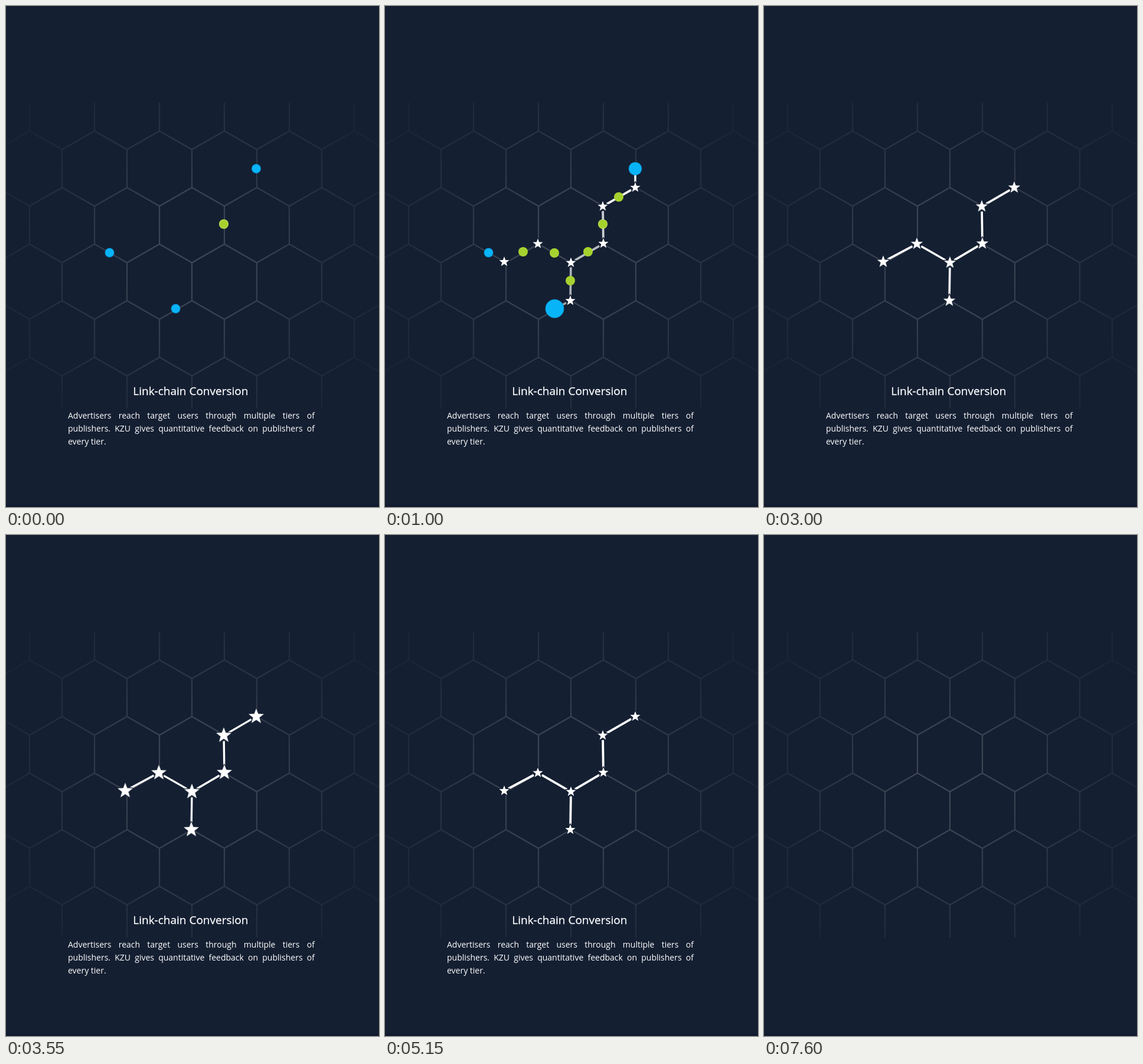
Recreate the animation shown at these times as an HTML page with a canvas. Size 632 by 850 pixels, loop 8 s.

```html
<!DOCTYPE html>
<html lang="en">
<head>
<meta charset="utf-8">
<title>Link-chain Conversion</title>
<style>
  html, body { margin: 0; width: 100%; height: 100%; overflow: hidden; background: #141f32; }
  canvas { position: absolute; left: 0; top: 0; }
  #text { color: #fff; font: 14px/22px "Open Sans", sans-serif; }
  #text div { position: absolute; left: 105px; width: 418px; text-align-last: justify; white-space: nowrap; }
  #text h1 { position: absolute; left: 215.3px; top: 639.5px; margin: 0; white-space: nowrap;
    font: 19px/26px "Open Sans", sans-serif; -webkit-text-stroke: .3px #fff; }
  #text .last { text-align-last: left; }
</style>
</head>
<body>
<canvas id="stage" width="632" height="850"></canvas>
<div id="text">
  <h1>Link-chain Conversion</h1>
  <div style="top:684px">Advertisers reach target users through multiple tiers of</div>
  <div style="top:706px">publishers. KZU gives quantitative feedback on publishers of</div>
  <div style="top:728px" class="last">every tier.</div>
</div>
<script>
const LOOP = 8000, BG = '#141f32', BLUE = '#08b4f8', GREEN = '#a6d22f';
const ctx = document.getElementById('stage').getContext('2d');
const text = document.getElementById('text');

const stars = [[424, 308], [369, 340], [370, 403], [315, 435.5], [314, 500], [259, 403.5], [202, 434]];
const greens = [[396, 324], [344, 417], [314, 466], [287, 419], [234, 417]];
const hub = [369, 370];
// Each dot: position, then the start of its two pulses
const blues = [
  { at: [424, 276], star: 0, pulses: [300, 690], lineStart: 600 },
  { at: [287.5, 513.5], star: 4, pulses: [380, 810], lineStart: 780 },
  { at: [175.5, 418.5], star: 6, pulses: [450, 1000], lineStart: 1000 }
];
// Star links: from, to, start of the fade
const links = [[0, 1, 620], [1, 2, 700], [2, 3, 740], [3, 4, 760], [3, 5, 1000], [5, 6, 1000]];

const clamp = x => Math.max(0, Math.min(1, x));
const ramp = (t, start, length) => clamp((t - start) / length);
const smooth = x => x * x * (3 - 2 * x);
const pulse = (t, start, length) => Math.sin(Math.PI * ramp(t, start, length));
const distance = (a, b) => Math.hypot(a[0] - b[0], a[1] - b[1]);
const appear = (t, p) => ramp(t, 30 + distance(p, hub) * 2.6, 220);

function disc([x, y], r, fill, alpha) {
  ctx.globalAlpha = alpha;
  ctx.fillStyle = fill;
  ctx.beginPath();
  ctx.arc(x, y, r, 0, 7);
  ctx.fill();
}

function line(a, b, trimA, trimB, width, alpha) {
  const d = distance(a, b), ux = (b[0] - a[0]) / d, uy = (b[1] - a[1]) / d;
  ctx.globalAlpha = alpha;
  ctx.strokeStyle = '#fff';
  ctx.lineWidth = width;
  ctx.beginPath();
  ctx.moveTo(a[0] + ux * trimA, a[1] + uy * trimA);
  ctx.lineTo(b[0] - ux * trimB, b[1] - uy * trimB);
  ctx.stroke();
}

function star([x, y], r, alpha, halo) {
  ctx.beginPath();
  for (let i = 0; i < 10; i++) {
    const k = i % 2 ? r * .42 : r, a = Math.PI * (i / 5 - .5);
    ctx.lineTo(x + k * Math.cos(a), y + k * Math.sin(a));
  }
  ctx.closePath();
  ctx.lineWidth = 3;
  ctx.strokeStyle = BG;
  ctx.globalAlpha = alpha;
  ctx.stroke();
  ctx.lineWidth = 1.6;
  ctx.strokeStyle = '#fff';
  ctx.globalAlpha = alpha * halo * .35;
  ctx.stroke();
  ctx.fillStyle = '#fff';
  ctx.globalAlpha = alpha;
  ctx.fill();
}

const glow = ctx.createRadialGradient(316, 425, 0, 316, 425, 345);
[[0, .25], [.3, .22], [.65, .115], [1, .035]].forEach(([at, a]) =>
  glow.addColorStop(at, `rgba(195,195,188,${a})`));

function grid() {
  ctx.globalAlpha = 1;
  ctx.strokeStyle = glow;
  ctx.lineWidth = 2.2;
  ctx.lineJoin = 'round';
  ctx.beginPath();
  for (let row = 0; row < 5; row++) {
    const y = 212 + row * 96, peak = row % 2 ? -15 : -70;
    for (let x = peak; x < 700; x += 110) {
      ctx.moveTo(x, row ? y - 64.5 + 64.5 : y);
      ctx.lineTo(x + 55, y + 31.5);
      ctx.lineTo(x + 110, y);
      ctx.moveTo(x + 55, y + 31.5);
      ctx.lineTo(x + 55, row < 4 ? y + 96 : 683);
      if (!row) {
        ctx.moveTo(x, 164);
        ctx.lineTo(x, y);
      }
    }
  }
  ctx.stroke();
}

function draw(t) {
  const visible = 1 - smooth(ramp(t, 7000, 600));
  const dots = 1 - ramp(t, 1900, 1000);
  const swell = pulse(t, 2750, 2350);
  const trim = 8 + 2 * swell, width = 3.8 - .5 * swell;

  ctx.globalAlpha = 1;
  ctx.fillStyle = BG;
  ctx.fillRect(0, 0, 632, 850);
  ctx.fillStyle = '#121a30';
  ctx.fillRect(0, 846, 632, 4);
  grid();

  for (const [a, b, start] of links)
    line(stars[a], stars[b], trim, trim, width, ramp(t, start, 400) * visible);
  for (const b of blues)
    line(b.at, stars[b.star], 0, trim, 3.4, ramp(t, b.lineStart, 400) * dots);

  for (const p of greens) disc(p, 8, GREEN, appear(t, p) * dots);
  // The hub is two stacked dots with a pale rim
  disc(hub, 8, '#cfe87a', dots * dots);
  disc(hub, 7, GREEN, dots);
  disc(hub, 8, GREEN, dots * .45);

  for (const b of blues) {
    const grow = b.pulses.reduce((sum, s) => sum + pulse(t, s, 400) ** 2, 0);
    const r = 8 + 8 * Math.min(1, grow);
    disc(b.at, r, '#0a86bd', dots);
    disc(b.at, r - .8, BLUE, dots);
  }

  for (const p of stars) star(p, 9 + 4.5 * swell, appear(t, p) * visible, swell);
  text.style.opacity = visible;
}

function frame(now) {
  draw(now % LOOP);
  requestAnimationFrame(frame);
}
requestAnimationFrame(frame);
</script>
</body>
</html>
```
